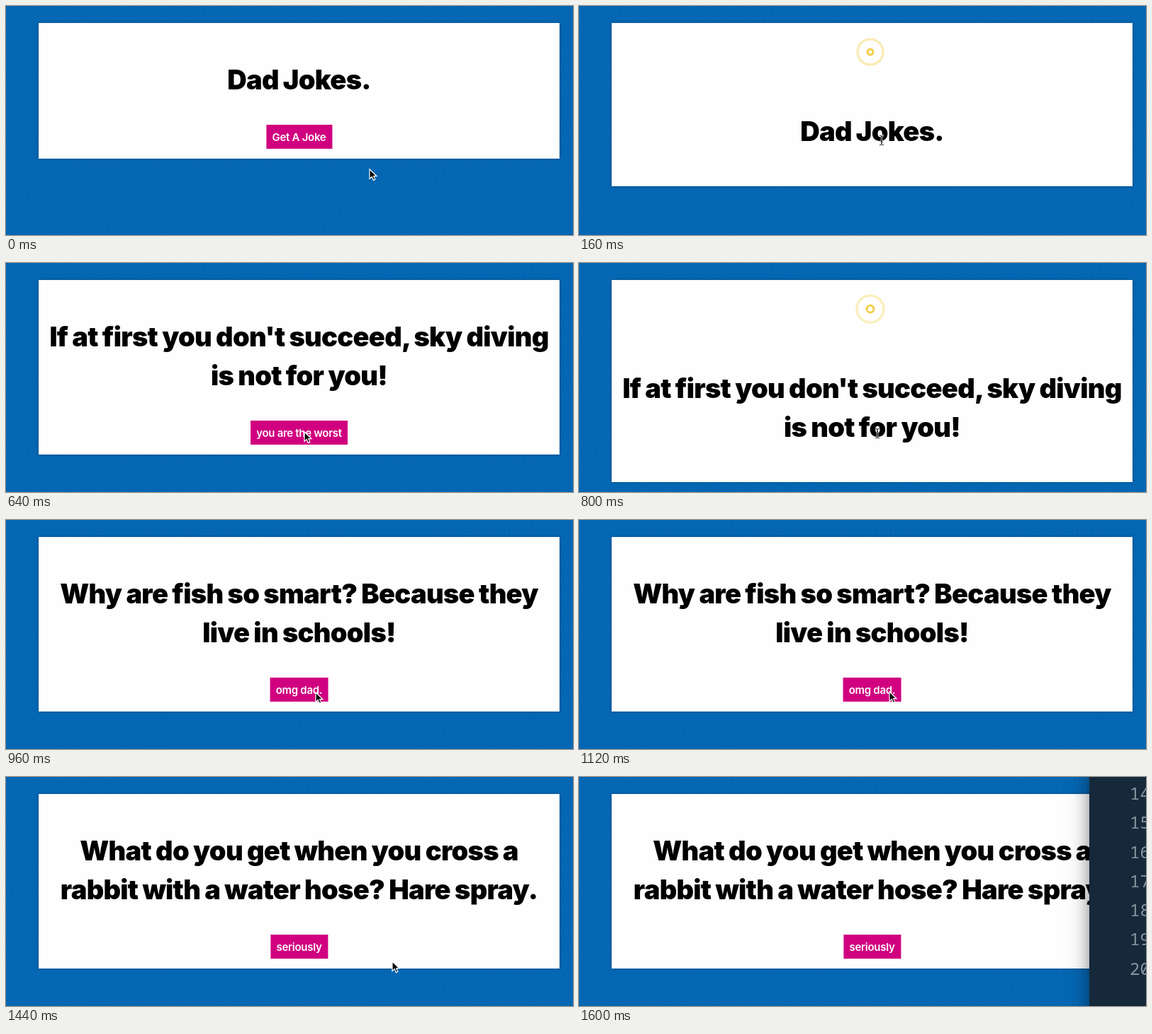
Recreate the animation shown at these times as an HTML page. Size 800 by 324 pixels, loop 1760 ms.

```html
<!DOCTYPE html>
<html lang="en">
<head>
<meta charset="utf-8">
<title>Dad Jokes</title>
<style>
  html, body { margin: 0; width: 100%; height: 100%; overflow: hidden; background: #0568b4; }
  .stage { position: relative; width: 800px; height: 324px; overflow: hidden; font-family: Inter, sans-serif; }
  .stage > * { position: absolute; }
  .waves { inset: 0; }

  /* --at is the first 160 ms beat of a layer */
  .one, .two, .three { visibility: hidden; animation: 1760ms step-end calc((var(--at) - 11) * 160ms) infinite; }
  .one { animation-name: one; }
  .two { animation-name: two; }
  .three { animation-name: three; }
  @keyframes one { 0% { visibility: visible; } 9.09%, 100% { visibility: hidden; } }
  @keyframes two { 0% { visibility: visible; } 18.18%, 100% { visibility: hidden; } }
  @keyframes three { 0% { visibility: visible; } 27.27%, 100% { visibility: hidden; } }

  .card {
    left: 46px; top: 24px; width: 735px; height: 247px;
    background: #fffeff; box-shadow: inset 0 0 1px #8fb8dc, 0 0 4px rgba(0, 0, 0, .3);
    text-align: center; white-space: nowrap;
  }
  .card > * { position: absolute; }
  .card p {
    left: 0; right: 0; top: 53px; margin: 0;
    font-size: 38px; font-weight: 900; line-height: 55px; color: #000;
    letter-spacing: -.7px; word-spacing: -.8px;
  }
  .card b {
    left: 50%; bottom: 14.5px; height: 34px; padding: 0 8.7px; transform: translateX(-50%);
    background: #d00080; color: #fff; font-size: 15px; font-weight: 600; line-height: 35px;
    letter-spacing: -.3px;
  }
  .short { height: 192px; }
  .load { height: 286px; }
  .load.short { height: 231px; }
  .load p { top: 126px; }
  .ring { left: 340px; top: 16px; width: 50px; height: 50px; fill: none; stroke: #f1cf4c; stroke-width: 3; }
  .ring :first-child { stroke: #f4dc70; stroke-width: 3.5; }

  .editor {
    left: 720px; top: -20px; width: 120px; height: 364px;
    background: #15293a; box-shadow: 0 6px 26px rgba(0, 0, 0, .5);
  }
  .editor pre {
    margin: 0; position: absolute; left: 57px; top: 22px;
    font: 24px/41.3px "Noto Sans Mono", monospace; color: #8795a0;
  }

  .pointer { left: 0; top: 0; width: 20px; height: 24px; overflow: visible; animation: move 1760ms step-end infinite; }
  @keyframes move {
    0% { transform: translate(513px, 231px); }
    9.09% { transform: translate(427px, 190px); visibility: hidden; }
    18.18% { transform: translate(426px, 187px); visibility: visible; }
    27.27% { transform: translate(424px, 214px); }
    36.36% { transform: translate(421px, 239px); }
    45.45% { transform: translate(421px, 241px); visibility: hidden; }
    54.54% { transform: translate(437px, 244px); visibility: visible; }
    63.63% { transform: translate(438px, 243px); }
    72.72% { transform: translate(545px, 261px); visibility: visible; }
    90.9%, 100% { transform: translate(545px, 261px); visibility: hidden; }
  }
  .beam { width: 10px; height: 16px; margin: -8px 0 0 -5px; fill: none; overflow: visible; }
</style>
</head>
<body>
<div class="stage">
  <svg class="waves" width="800" height="324">
    <defs>
      <pattern id="wave" width="7" height="26" patternUnits="userSpaceOnUse" patternTransform="rotate(3)">
        <path d="M1 0q5 6.5 0 13t0 13M8 0q5 6.5 0 13t0 13M-6 0q5 6.5 0 13t0 13" fill="none" stroke="#004a96" stroke-opacity=".14" stroke-width="1.6"/>
      </pattern>
    </defs>
    <rect width="800" height="324" fill="url(#wave)"/>
  </svg>

  <div class="card short one" style="--at:0"><p>Dad Jokes.</p><b>Get A Joke</b></div>
  <div class="card short load one" style="--at:1">
    <svg class="ring"><circle cx="25" cy="25" r="18" opacity=".5"/><circle cx="25" cy="25" r="4"/></svg>
    <p>Dad Jokes.</p>
  </div>

  <div class="card three" style="--at:2"><p>If at first you don't succeed, sky diving<br>is not for you!</p><b>you are the worst</b></div>
  <div class="card load one" style="--at:5">
    <svg class="ring"><circle cx="25" cy="25" r="19" opacity=".45"/><circle cx="25" cy="25" r="5"/></svg>
    <p>If at first you don't succeed, sky diving<br>is not for you!</p>
  </div>

  <div class="card two" style="--at:6"><p>Why are fish so smart? Because they<br>live in schools!</p><b>omg dad.</b></div>
  <div class="card load one" style="--at:8">
    <svg class="ring"><circle cx="25" cy="25" r="20" opacity=".35"/><circle cx="25" cy="25" r="7"/></svg>
    <p>Why are fish so smart? Because they<br>live in schools!</p>
  </div>

  <div class="card two" style="--at:9"><p>What do you get when you cross a<br>rabbit with a water hose? Hare spray.</p><b>seriously</b></div>
  <div class="editor one" style="--at:10"><pre>14
15
16
17
18
19
20</pre></div>

  <svg class="pointer"><path d="M0 0V13.5L3.2 10.6L5.4 15.6L7.8 14.5L5.7 9.7H10Z" fill="#000" stroke="#fff" stroke-width="1.2"/></svg>
  <svg class="beam one" style="--at:1;left:427px;top:190px"><use href="#ibeam"/></svg>
  <svg class="beam one" style="--at:5;left:421px;top:241px">
    <g id="ibeam">
      <path d="M2 1Q5 1 5 3.5V12.5Q5 15 2 15M8 1Q5 1 5 3.5V12.5Q5 15 8 15M3.5 10H6.5" stroke="#fff" stroke-width="2.6"/>
      <path d="M2 1Q5 1 5 3.5V12.5Q5 15 2 15M8 1Q5 1 5 3.5V12.5Q5 15 8 15M3.5 10H6.5" stroke="#222"/>
    </g>
  </svg>
</div>
</body>
</html>
```
